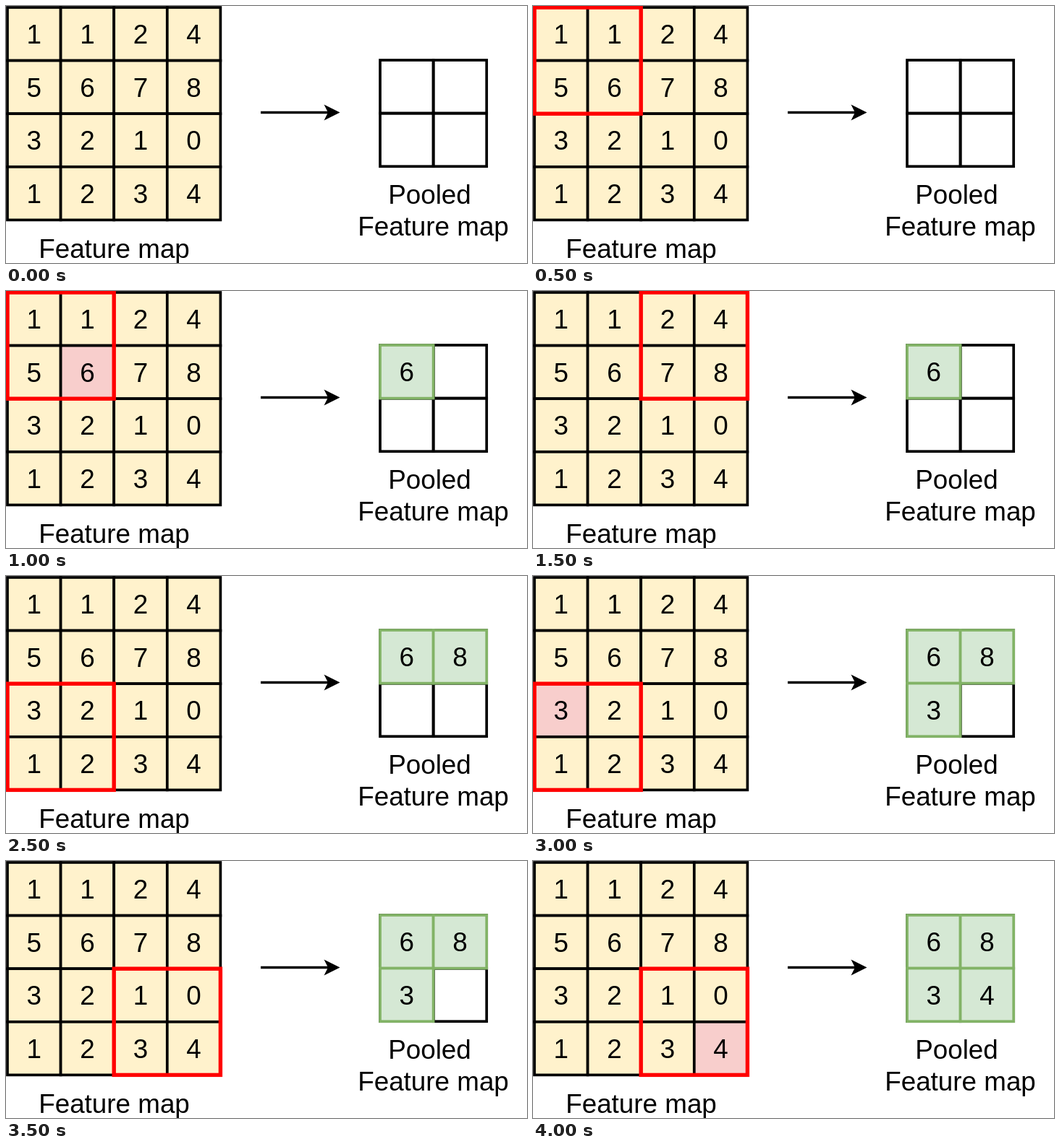
Animation of 720x356 px, one loop 4500 ms. Source, as an HTML page:

```html
<!DOCTYPE html>
<html lang="en">
<head>
<meta charset="utf-8">
<title>Max pooling</title>
<style>
  html, body { margin: 0; width: 100%; height: 100%; overflow: hidden; background: #fff; }
  svg { display: block; }
  text { font: 36.8px "Liberation Sans", Arial, sans-serif; text-anchor: middle; }
  rect { stroke: #000; stroke-width: 3.7; fill: none; }
  .input { fill: #fff2cc; }
  .input.max { fill: #f8cecc; }
  .pooled { fill: #d5e8d4; stroke: #82b366; }
  .window { stroke: #f00; stroke-width: 5.4; }
</style>
</head>
<body>
<svg id="stage" width="720" height="356" viewBox="0 0 720 356">
  <path d="M352 147.5H446" stroke="#000" stroke-width="3.7"/>
  <path d="M461.500 147.500L439.500 158.500L445 147.500L439.500 136.500Z"/>
  <text x="149.500" y="349">Feature map</text>
  <text x="585.500" y="274">Pooled</text>
  <text x="590.500" y="318">Feature map</text>
</svg>
<script>
const CELL = 73.6, STEP_MS = 500, STEPS = 9;
const INPUT = { x: 2, y: 2 }, OUTPUT = { x: 517, y: 75 };
const values = [[1, 1, 2, 4], [5, 6, 7, 8], [3, 2, 1, 0], [1, 2, 3, 4]];
const stage = document.getElementById("stage");

function add(tag, attributes) {
  const node = document.createElementNS("http://www.w3.org/2000/svg", tag);
  for (const name in attributes) node.setAttribute(name, attributes[name]);
  return stage.appendChild(node);
}

function addSquare(origin, col, row, className, size = CELL) {
  return add("rect", {
    x: origin.x + col * CELL, y: origin.y + row * CELL,
    width: size, height: size, class: className
  });
}

function addDigit(origin, col, row, value) {
  const digit = add("text", {
    x: origin.x + (col + 0.5) * CELL, y: origin.y + (row + 0.5) * CELL + 13.4
  });
  digit.textContent = value;
  return digit;
}

const inputCells = values.map((line, row) => line.map((value, col) => {
  const cell = addSquare(INPUT, col, row, "input");
  addDigit(INPUT, col, row, value);
  return cell;
}));

const quadrants = [0, 1, 2, 3].map(i => ({ col: i % 2, row: i >> 1 }));
for (const { col, row } of quadrants) addSquare(OUTPUT, col, row, "");

// Each quadrant has a selection window, its largest cell and a pooled result.
const pools = quadrants.map(({ col, row }) => {
  const members = [0, 1, 2, 3].map(i => ({ c: col * 2 + i % 2, r: row * 2 + (i >> 1) }));
  const best = members.reduce((a, b) => values[b.r][b.c] > values[a.r][a.c] ? b : a);
  return {
    maxCell: inputCells[best.r][best.c],
    frame: addSquare(INPUT, col * 2, row * 2, "window", CELL * 2),
    result: [
      addSquare(OUTPUT, col, row, "pooled"),
      addDigit(OUTPUT, col, row, values[best.r][best.c])
    ]
  };
});

const show = (node, visible) => node.setAttribute("visibility", visible ? "visible" : "hidden");

function render(time) {
  const step = Math.floor(time / STEP_MS) % STEPS;
  pools.forEach(({ maxCell, frame, result }, i) => {
    const selectStep = i * 2 + 1, poolStep = selectStep + 1;
    show(frame, step === selectStep || step === poolStep);
    maxCell.classList.toggle("max", step === poolStep);
    result.forEach(node => show(node, step >= poolStep));
  });
}

const start = performance.now();
function tick() {
  render(performance.now() - start);
  requestAnimationFrame(tick);
}
tick();
</script>
</body>
</html>
```
